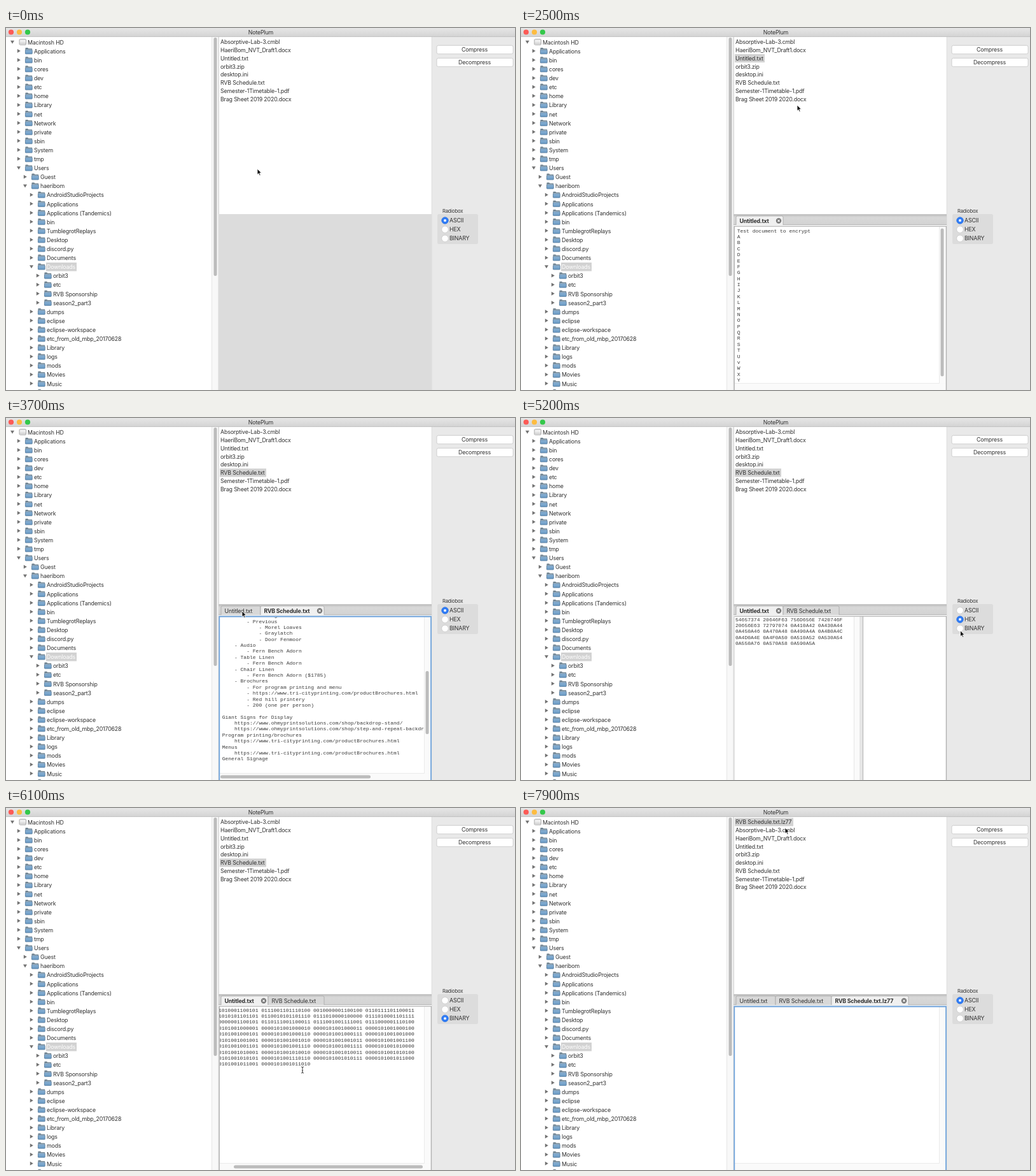
An HTML page for the animation above (8 s loop, 800 px wide and 568 px high).

```html
<!DOCTYPE html>
<html lang="en">
<head>
<meta charset="utf-8">
<title>NotePlum</title>
<style>
  html, body { margin: 0; width: 100%; height: 100%; overflow: hidden; background: #fff; }
  svg { display: block; width: 800px; height: 568px; }
  text { font: 8.8px Inter, "Open Sans", sans-serif; letter-spacing: -.15px; fill: #303030; white-space: pre; }
  .mono { font: 8.02px "Liberation Mono", "Courier New", monospace; letter-spacing: 0; fill: #3a3a3a; }
  .bold { font-weight: 700; letter-spacing: -.2px; }
  .mid { text-anchor: middle; }
  .thumb { fill: #bcbcbc; }
</style>
</head>
<body>
<svg viewBox="0 0 800 568">
  <defs>
    <linearGradient id="bar" x2="0" y2="1"><stop stop-color="#e6e6e6"/><stop offset="1" stop-color="#d3d3d3"/></linearGradient>
    <linearGradient id="strip" x2="0" y2="1"><stop stop-color="#c4c4c4"/><stop offset=".25" stop-color="#d8d8d8"/><stop offset="1" stop-color="#d2d2d2"/></linearGradient>
    <linearGradient id="blue" x2="0" y2="1"><stop stop-color="#8db4d6"/><stop offset="1" stop-color="#6496c2"/></linearGradient>
    <clipPath id="page"><rect x="336" y="312" width="321" height="245"/></clipPath>
    <g id="folder">
      <path d="M.4 9V.8Q.4 0 1.2 0H4.2L5.4 1.2H10.4Q11.2 1.2 11.2 2V9Z" fill="#6b7f8d"/>
      <path d="M1.3 2.3H10.3V3.6H1.3Z" fill="#c9d6de"/>
      <rect x=".4" y="3.3" width="10.8" height="6.3" rx=".7" fill="url(#blue)" stroke="#56799a" stroke-width=".7"/>
    </g>
  </defs>

  <rect width="800" height="568" fill="#fff"/>
  <rect x="323" y="14" width="11" height="554" fill="#f8f8f8"/>
  <path d="M323.5 14V568" stroke="#e6e6e6"/>
  <path d="M334.2 14V568" stroke="#c4c4c4"/>
  <rect class="thumb" x="326.5" y="15" width="5" height="374" rx="2.5"/>
  <rect x="334" y="292" width="335" height="276" fill="#dcdcdc"/>
  <rect x="669" y="14" width="131" height="554" fill="#e9e9e9"/>
  <path d="M669.2 14V568" stroke="#dedede"/>
  <g id="tree"></g>
  <g id="files"></g>
  <g id="side"></g>
  <g id="editor"></g>

  <rect width="800" height="14" fill="url(#bar)"/>
  <path d="M0 13.6H800" stroke="#bdbdbd" stroke-width=".8"/>
  <circle cx="8" cy="6.5" r="4.1" fill="#fc5b57"/>
  <circle cx="21" cy="6.5" r="4.1" fill="#fdbc40"/>
  <circle cx="34" cy="6.5" r="4.1" fill="#34c84a"/>
  <text class="mid" x="400.5" y="10">NotePlum</text>

  <g id="cursor">
    <path id="arrow" d="M0 0V9.2L2.1 7.2 3.6 10.4 5.1 9.7 3.7 6.6H6.6Z" fill="#111" stroke="#fff" stroke-width=".8"/>
    <path id="beam" d="M-2-5Q0-5 0-3.5Q0-5 2-5M0-4V4M-2 5Q0 5 0 3.5Q0 5 2 5M-1 1H1" fill="none" stroke="#333" stroke-width=".9"/>
  </g>
</svg>
<script>
const $ = id => document.getElementById(id);
const PITCH = 9.38;
const text = (x, y, s, cls = "", extra = "") =>
  `<text x="${x}" y="${y}" class="${cls}" ${extra}>${s}</text>`;
const rect = (x, y, w, h, fill, extra = "") =>
  `<rect x="${x}" y="${y}" width="${w}" height="${h}" fill="${fill}" ${extra}/>`;
const line = (d, color, w = 1) =>
  `<path d="${d}" fill="none" stroke="${color}" stroke-width="${w}"/>`;
const thumb = (x, y, w, h, id = "") =>
  rect(x, y, w, h, "#bcbcbc", `rx="2.5" id="${id}"`);
const lines = (rows, x, y, pitch = PITCH) =>
  rows.map((s, i) => text(x, y + 2.6 + i * pitch, s, "mono")).join("");

// Directory tree: depth digit, then name; "*" marks an open folder
const tree = `0*Macintosh HD
1Applications|1bin|1cores|1dev|1etc|1home|1Library|1net|1Network|1private|1sbin|1System|1tmp
1*Users|2Guest|2*haeribom
3AndroidStudioProjects|3Applications|3Applications (Tandemics)|3bin|3TumblegrotReplays
3Desktop|3discord.py|3Documents|3*Downloads|4orbit3|4etc|4RVB Sponsorship|4season2_part3
3dumps|3eclipse|3eclipse-workspace|3etc_from_old_mbp_20170628|3Library|3logs|3mods|3Movies
3Music|3Pictures`.split(/[|\n]/);

$("tree").innerHTML = tree.map((row, i) => {
  const x = 10 * row[0], y = 22.5 + i * 14.1, open = row[1] === "*";
  const name = row.slice(open ? 2 : 1), picked = name === "Downloads";
  const mark = open ? "M-3-2.2H3L0 2.8Z" : "M-2.2-3V3L2.8 0Z";
  const icon = i
    ? `<use href="#folder" x="${x + 20}" y="${y - 5.5}"/>`
    : rect(21, 17.5, 10.5, 9, "#ececec", 'rx="1.5" stroke="#999" stroke-width=".8"') + line("M21.5 24H31", "#aaa", .8);
  return `<path d="${mark}" transform="translate(${x + 10} ${y - .5})" fill="#737373"/>` + icon +
    (picked ? rect(x + 33, y - 7, 48, 13.5, "#d2d2d2") : "") +
    text(x + 34, y + 3.2, name, "", picked ? 'style="fill:#fff"' : "");
}).join("");

const baseFiles = ["Absorptive-Lab-3.cmbl", "HaeriBom_NVT_Draft1.docx", "Untitled.txt", "orbit3.zip",
  "desktop.ini", "RVB Schedule.txt", "Semester-1Timetable-1.pdf", "Brag Sheet 2019 2020.docx"];
const packed = "RVB Schedule.txt.lz77";
const tabInfo = { "Untitled.txt": 62, "RVB Schedule.txt": 88, [packed]: 109 };

// Document contents and their hex and binary dumps
const letters = [..."ABCDEFGHIJKLMNOPQRSTUvWXYZ"];
const note = ["Test document to encrypt", ...letters];
const bytes = [...note.join("\n")].map(c => c.charCodeAt(0));
function dump(base, width, perGroup) {
  const all = bytes.map(b => b.toString(base).toUpperCase().padStart(width, "0"));
  const groups = [], rows = [];
  while (all.length) groups.push(all.splice(0, perGroup).join(""));
  while (groups.length) rows.push(groups.splice(0, 4).join(" "));
  return rows;
}
const hex = dump(16, 2, 4), binary = dump(2, 8, 2);
const plan = `Schedule
    - Doors open
    - Opening speech
    - Dinner
    - Awards
    - Closing

Tasks
    - Tickets
        - Print
        - Sell at lunch
    - Posters
        - Hallways
        - Main entrance
    - Volunteers
        - Set up
        - Clean up

Rentals
    - Food
    - Our catering
        - Previous
            - Morel Loaves
            - Graylatch
            - Door Fenmoor
    - Audio
        - Fern Bench Adorn
    - Table Linen
        - Fern Bench Adorn
    - Chair Linen
        - Fern Bench Adorn ($1785)
    - Brochures
        - For program printing and menu
        - https://www.tri-cityprinting.com/productBrochures.html
        - Red hill printery
        - 200 (one per person)

Giant Signs for Display
    https://www.ohmyprintsolutions.com/shop/backdrop-stand/
    https://www.ohmyprintsolutions.com/shop/step-and-repeat-backdrop/
Program printing/brochures
    https://www.tri-cityprinting.com/productBrochures.html
Menus
    https://www.tri-cityprinting.com/productBrochures.html
General Signage`.split("\n");

function drawFiles(selected, names) {
  $("files").innerHTML = names.map((name, i) => {
    const y = 22 + i * 12.77;
    const w = selected === packed ? 92 : name === "Untitled.txt" ? 47 : 73;
    return (name === selected ? rect(336, y - 6.5, w, 13, "#d2d2d2") : "") + text(337, y + 3.2, name);
  }).join("");
}

function drawSide(mode) {
  const button = (y, label) =>
    rect(677, y - 6.7, 120, 13.4, "#fff", 'rx="2.5" stroke="#c6c6c6" stroke-width=".8"') +
    text(736.5, y + 3.3, label, "mid");
  const radio = (label, i) => {
    const y = 302 + i * 14.1, on = label === mode;
    return `<circle cx="690" cy="${y}" r="5.3" fill="${on ? "#2f7cf6" : "#fff"}" stroke="${on ? "#2a70e0" : "#c4c4c4"}" stroke-width=".7"/>` +
      (on ? `<circle cx="690" cy="${y}" r="2" fill="#fff"/>` : "") + text(697, y + 3.2, label);
  };
  $("side").innerHTML = button(34, "Compress") + button(54, "Decompress") +
    text(686, 290, "Radiobox", "", 'style="font-size:7.6px"') +
    rect(678, 292, 64, 47, "#dcdcdc", 'rx="2.5"') + ["ASCII", "HEX", "BINARY"].map(radio).join("");
}

function drawTabs(tabs, active) {
  let x = 338;
  return rect(334, 293, 335, 18, "url(#strip)") + line("M334 293H669", "#b5b5b5") +
    line("M334 308.5H669", "#b8b8b8") + rect(334, 309, 335, 2.5, "#efefef") +
    tabs.map(name => {
      const on = name === active, w = tabInfo[name] + (on ? 12 : 0), left = x;
      x += w;
      const c = x - 7;
      return `<path d="M${left} 309V297Q${left} 295 ${left + 2} 295H${x - 2}Q${x} 295 ${x} 297V309" fill="${on ? "#f0f0f0" : "#d8d8d8"}" stroke="#a6a6a6" stroke-width=".8"/>` +
        text(left + 5.5, 305.7, name, on ? "bold" : "") +
        (on ? `<circle cx="${c}" cy="302.5" r="4.2" fill="#777"/>` +
          line(`M${c - 1.6} 300.9l3.2 3.2m0-3.2l-3.2 3.2`, "#fff", 1.1) : "");
    }).join("");
}

function drawEditor(tabs, active, mode) {
  if (!active) return $("editor").innerHTML = "";
  const focus = active !== "Untitled.txt";
  let out = drawTabs(tabs, active) + rect(335, 311, 333.5, 257, "#fff");
  if (mode === "HEX") {
    out += rect(524, 311, 8, 257, "#fafafa") + line("M523.5 311V568", "#e6e6e6") +
      rect(532, 311, 5, 257, "#e6e6e6") + line("M537.5 311V568", "#aaa", .9) +
      lines(hex, 337, 316, 9.3);
  } else {
    out += rect(657, 311, 11, 257, "#fafafa") + rect(336, 557.5, 332, 10.5, "#fafafa") +
      line("M657.5 311V557.5H336", "#e6e6e6", .8);
    let body = "";
    if (mode === "BINARY") {
      body = lines(binary, 337.5, 317, 9.42);
      out += thumb(338, 560.5, 297, 5, "bar-x");
    } else if (active === "Untitled.txt") {
      body = lines(note.slice(0, 26), 339.7, 318);
      out += thumb(659.5, 314.5, 5, 232);
    } else if (active === "RVB Schedule.txt") {
      body = lines(plan, 339.7, 318);
      out += thumb(659.5, 315, 5, 99, "bar-y") + thumb(337, 560.5, 236, 5);
    }
    out += `<g clip-path="url(#page)"><g id="body">${body}</g></g>`;
  }
  out += focus
    ? line("M335.3 568V311.5H668V568", "#6fa3dc", 1.8)
    : line("M335 311.3H668.5", "#a8a8a8", .9) + line("M668.3 311V568", "#999", .9) +
      line("M335.3 311V568", mode === "HEX" ? "#dcdcdc" : "#999", .9);
  $("editor").innerHTML = out;
}

// Pointer path: time, x, y
const path = [[100, 395, 221], [600, 366, 46], [900, 366, 46], [1200, 368, 48], [1500, 377, 54],
  [1800, 393, 72], [2500, 434, 121], [2800, 392, 86], [2900, 392, 86], [3200, 455, 420],
  [3500, 455, 420], [3700, 371, 303], [3800, 371, 303], [4400, 690, 316], [4700, 690, 316],
  [5200, 690.5, 333.7], [5400, 690, 332], [5800, 480, 425], [6100, 466, 411], [6300, 462, 405],
  [6500, 520, 122], [7000, 737, 33], [7500, 737, 33], [7700, 408, 23], [7900, 415, 31]];

const ramp = (t, a, b) => Math.min(1, Math.max(0, (t - a) / (b - a)));
function pointer(t) {
  const i = path.findIndex(p => p[0] >= t);
  if (i < 1) return path[0].slice(1);
  const a = path[i - 1], b = path[i], k = ramp(t, a[0], b[0]);
  const e = k * k * (3 - 2 * k);
  return [a[1] + (b[1] - a[1]) * e, a[2] + (b[2] - a[2]) * e];
}

// Latest value whose start time has passed
const at = (t, steps) => steps.filter(s => s[0] <= t).pop()[1];
const [note1, plan1] = ["Untitled.txt", "RVB Schedule.txt"];
let lastKey = "";

function draw(t) {
  const selected = at(t, [[0, ""], [600, note1], [2800, plan1], [7800, packed]]);
  const active = at(t, [[0, ""], [1000, note1], [2900, plan1], [3800, note1], [7900, packed]]);
  const count = at(t, [[0, 0], [1000, 1], [2900, 2], [7900, 3]]);
  const mode = at(t, [[0, "ASCII"], [4500, "HEX"], [5400, "BINARY"], [7900, "ASCII"]]);
  const names = t >= 7400 ? [packed, ...baseFiles] : baseFiles;
  const key = [selected, active, count, mode, names.length].join();
  if (key !== lastKey) {
    drawFiles(selected, names);
    drawSide(mode);
    drawEditor(Object.keys(tabInfo).slice(0, count), active, mode);
    lastKey = key;
  }
  if (active === plan1) {
    const k = ramp(t, 3000, 3500);
    $("body").setAttribute("transform", `translate(0 ${-k * (21 * PITCH - 1)})`);
    $("bar-y").setAttribute("y", 315 + 82 * k);
  } else if (mode === "BINARY") {
    const k = ramp(t, 5800, 6100);
    $("body").setAttribute("transform", `translate(${-18 * k} 0)`);
    $("bar-x").setAttribute("x", 338 + 20 * k);
  }
  const [x, y] = pointer(t);
  const overText = active && x > 336 && x < 657 && y > 312;
  $("cursor").setAttribute("transform", `translate(${x} ${y})`);
  $("arrow").style.display = overText ? "none" : "";
  $("beam").style.display = overText ? "" : "none";
}

const start = performance.now();
function tick() {
  const t = (performance.now() - start) % 8000;
  draw(Math.floor(t / 100) * 100);
  requestAnimationFrame(tick);
}
tick();
</script>
</body>
</html>
```
